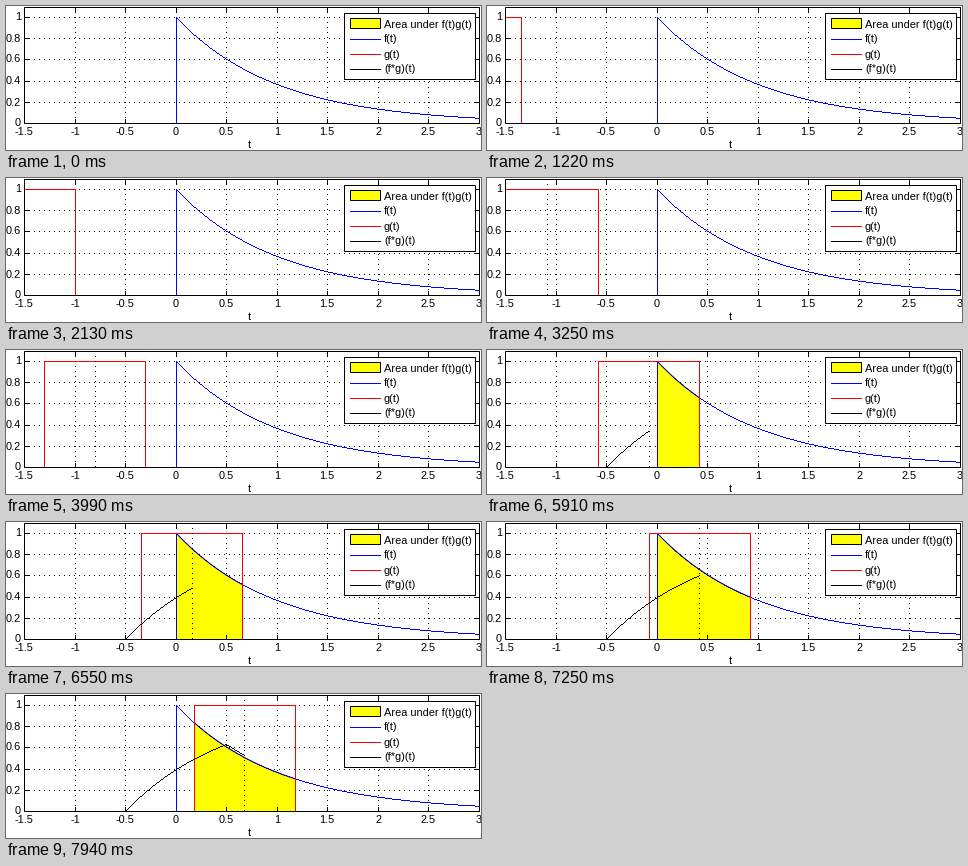
A matplotlib script for the animation above (7.99 s loop, 475 by 144 pixels).

```python
import numpy as np
import matplotlib.pyplot as plt
from matplotlib.animation import FuncAnimation
from matplotlib.patches import Polygon, Rectangle

plt.rcParams["path.simplify"] = False

W, H, DPI = 475, 144, 100
PX = 72 / DPI                      # one pixel in points
LOOP, FRAMES = 7990, 170
HOLD, STEP = 790, 160 / 3          # first pause and step time in ms
LEFT, RIGHT, TOP, BASE = 18, 473, 1, 117
T0, T1 = -1.5, 3
SCALE = (RIGHT - LEFT) / (T1 - T0)
BLUE, RED = "#0000ff", "#ff0000"
DOTS = (1, 4)

fig = plt.figure(figsize=(W / DPI, H / DPI), dpi=DPI, facecolor="white")
ax = fig.add_axes([0, 0, 1, 1])
ax.set_xlim(0, W)
ax.set_ylim(H, 0)
ax.axis("off")


def col(t):
    return int(np.floor(LEFT + 0.5 + SCALE * (t - T0)))


def row(v):
    return np.floor(BASE + 0.5 - 106 * np.asarray(v))


def line(color="black", z=3, dash=None):
    ln, = ax.plot([], [], color=color, lw=PX, zorder=z, snap=False,
                  solid_capstyle="butt", dash_capstyle="butt")
    if dash:
        ln.set_linestyle((0, dash))
    return ln


def across(ln, x0, x1, y):
    ln.set_data([x0, x1 + 1], [y + 0.5] * 2)


def down(ln, x, y0, y1):
    ln.set_data([x + 0.5] * 2, [y0, y1 + 1])


def curve(ln, f, a, b):
    """Draw f as a crisp run of one-pixel steps."""
    x = np.arange(col(a), col(b) + 1)
    t = np.clip(T0 + (x - LEFT) / SCALE, a, b)
    y = row(f(t)) + 0.5
    gap = np.full(len(x), np.nan)
    ln.set_data(np.column_stack([x, x + 1, gap]).ravel(),
                np.column_stack([y, y, gap]).ravel())


def frame(x, y, w, h, fill, z):
    ax.add_patch(Rectangle((x + 0.5, y + 0.5), w, h, fc=fill, ec="black",
                           lw=PX, zorder=z, snap=False))


def label(x, y, s, ha="center"):
    ax.text(x, y, s, ha=ha, va="center_baseline", fontsize=11 * PX,
            family="Liberation Sans", zorder=12)


def decay(t):
    return np.exp(-t)


def conv(c):
    return np.exp(-np.maximum(c - 0.5, 0)) - np.exp(-(c + 0.5))


# axes, grid and tick labels
for k in range(10):
    t = T0 + 0.5 * k
    x = col(t)
    if 0 < k < 9:
        down(line(z=1, dash=DOTS), x, TOP, BASE)
        down(line(), x, BASE - 4, BASE)
        down(line(), x, TOP, TOP + 4)
    label(x, 125, f"{t:g}")
for k in range(6):
    y = row(k / 5)
    if k:
        across(line(z=1, dash=DOTS), LEFT, RIGHT, y)
        across(line(), LEFT, LEFT + 4, y)
        across(line(), RIGHT - 4, RIGHT, y)
    label(15, y - 0.5, f"{k / 5:g}", "right")
frame(LEFT, TOP, RIGHT - LEFT, BASE - TOP, "none", 9)
label(243, 138.5, "t")

# decaying exponential
down(line(BLUE, 4), col(0), row(1), BASE)
curve(line(BLUE, 5), decay, 0, T1)

# legend
frame(338, 7, 131, 66, "white", 10)
frame(344, 12, 30, 10, "yellow", 11)
rows = [("Area under f(t)g(t)", None), ("f(t)", BLUE),
        ("g(t)", RED), ("(f*g)(t)", "black")]
for k, (name, color) in enumerate(rows):
    y = 18 + 15 * k
    label(378, y - 0.5, name, "left")
    if color:
        across(line(color, 11), 344, 374, y)

# moving parts
area = Polygon([(0, 0)] * 3, fc="yellow", ec="black", lw=PX, zorder=2,
               snap=False)
ax.add_patch(area)
box_top, box_left, box_right = (line(RED, 6) for _ in range(3))
center = line(z=6, dash=DOTS)
result = line(z=7)


def upright(ln, t, top):
    ln.set_visible(t > T0 - 1e-6)
    down(ln, col(t), top, BASE)


def update(n):
    now = (n + 1) * LOOP / FRAMES
    i = min(15 + int((now - HOLD) // STEP), 149)
    r = -1.8 + 0.02 * i            # right edge of the box
    l, c = r - 1, r - 0.5
    roof = row(1)

    box_top.set_visible(r > T0 - 1e-6)
    across(box_top, col(max(l, T0)), col(r), roof)
    upright(box_left, l, roof)
    upright(box_right, r, roof)
    upright(center, c, TOP)

    area.set_visible(r > 0)
    result.set_visible(r > 0)
    if r > 0:
        a = np.linspace(max(l, 0), r, 60)
        x = np.linspace(col(a[0]), col(r), 60) + 0.5
        y = BASE + 0.5 - 106 * decay(a)
        area.set_xy(np.column_stack([np.r_[x[0], x, x[-1]],
                                     np.r_[BASE + 0.5, y, BASE + 0.5]]))
        curve(result, conv, -0.5, c)
    return area, box_top, box_left, box_right, center, result


anim = FuncAnimation(fig, update, frames=FRAMES, interval=LOOP // FRAMES,
                     init_func=lambda: update(0), repeat=True,
                     repeat_delay=0, blit=False)
plt.show()
```
